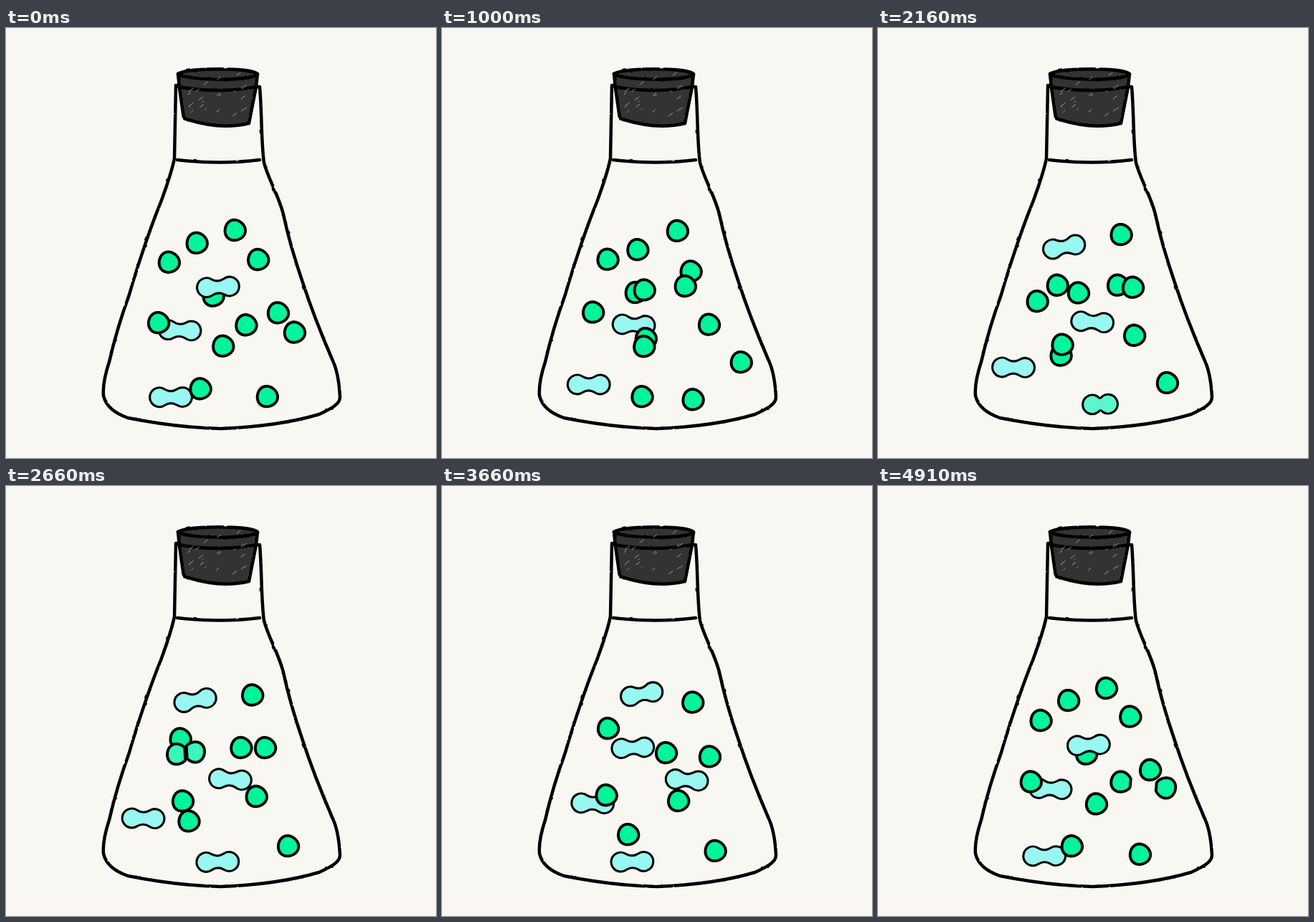
Animation of 600 by 600 pixels, one loop 5 s. Source, as an HTML page with a canvas:

```html
<!DOCTYPE html>
<html lang="en">
<head>
<meta charset="utf-8">
<title>Flask in equilibrium</title>
<style>
  html, body { margin: 0; width: 100%; height: 100%; overflow: hidden; background: #f8f7f2; }
  svg, canvas { position: absolute; left: 0; top: 0; width: 600px; height: 600px; }
</style>
</head>
<body>
<svg viewBox="0 0 600 600" fill="none" stroke="#000" stroke-width="4.5" stroke-linecap="round" stroke-linejoin="round">
  <filter id="rough" filterUnits="userSpaceOnUse" x="0" y="0" width="600" height="600" color-interpolation-filters="sRGB">
    <feTurbulence type="fractalNoise" baseFrequency=".1" numOctaves="2" seed="4"/>
    <feDisplacementMap in="SourceGraphic" scale="2" xChannelSelector="R" yChannelSelector="G"/>
  </filter>
  <g filter="url(#rough)">
    <path d="M240 80H237Q236 130 235 182C231 202 223 224 216 243C200 282 181 340 172 372C161 402 150 440 144 466
      C137 487 135 501 136 513C139 526 150 537 170 544C205 551 255 558 300 559C350 557 400 550 437 539
      C454 531 466 525 466 515C465 495 462 476 455 462C439 425 424 386 413 352C402 320 393 288 387 260
      C381 235 366 211 360 188C356 160 357 115 354 82H350"/>
    <path d="M239 184Q298 191 354 184"/>
    <path fill="#333" d="M240 64C255 55 340 55 351 64L349 82L339 133C310 140 280 137 248 126L242 84Z"/>
    <path d="M240 64C250 73 335 75 351 65M241 82Q296 92 350 82"/>
    <path id="scratches" stroke="#ccc" stroke-width=".7"/>
  </g>
</svg>
<canvas id="stage" width="600" height="600"></canvas>
<script>
const ctx = document.getElementById('stage').getContext('2d');
const GREEN = [0, 245, 155], BLUE = [152, 247, 240];
const STEPS = 60, LOOP = 5000;
const R = 14.2, LOBE = 13.4;
const TOUCH = 11, SPREAD = 16;     // half distance of the lobes when joining and when joined
const APART = 26, NEAR = 22;       // half distance of the atoms after a split and before a join

const clamp = v => Math.max(0, Math.min(1, v));
const lerp = (a, b, u) => a + (b - a) * u;
const smooth = u => u * u * (3 - 2 * u);
const blend = m => `rgb(${GREEN.map((g, i) => Math.round(lerp(g, BLUE[i], m)))})`;
const shift = ([x, y], angle, r) => [x + r * Math.cos(angle), y + r * Math.sin(angle)];

// Each pair forms at "join" and breaks at "split". Its halves then wander for some loops
// through their "via" points, evenly spread in time, to the next join.
const reactions = [
  {
    join: 16.5, split: 49.5, tilt: [-11, -11], swap: true,
    body: [[254, 317], [265, 298], [286, 287]],
    left: { loops: 1, via: [] },
    right: { loops: 4, via: [[331, 284], [349, 299], [350, 333], [327, 366], [291, 374], [252, 360], [228, 332]] }
  },
  {
    join: 26, split: 177, tilt: [-2, 5], swap: false,
    body: [[310, 525], [238, 519], [189, 473], [236, 425], [301, 410], [373, 412]],
    left: { loops: 4, via: [[263, 445], [259, 483], [274, 507]] },
    right: { loops: 4, via: [[418, 474], [393, 503], [375, 511], [355, 517]] }
  },
  {
    join: 33.5, split: 64, tilt: [-3, -3], swap: true,
    body: [[251, 372], [274, 363], [304, 361]],
    left: { loops: 1, via: [[284, 368]] },
    right: { loops: 4, via: [[360, 364], [380, 393], [362, 426], [322, 441], [277, 444], [233, 434], [210, 402]] }
  }
];

const tracks = reactions.flatMap(r => {
  const [a0, a1] = r.tilt.map(d => d * Math.PI / 180);
  const atom = ({ loops, via }, side) => {
    const from = side < 0 ? a1 + Math.PI : a1;
    const to = (side < 0) !== r.swap ? a0 + Math.PI : a0;
    const points = [shift(r.body[r.body.length - 1], from, APART), ...via, shift(r.body[0], to, NEAR)];
    return { draw: drawAtom, start: r.split, end: r.join + loops * STEPS, points, from, to };
  };
  return [
    { draw: drawPair, start: r.join, end: r.split, points: r.body, from: a0, to: a1 },
    atom(r.left, -1), atom(r.right, 1)
  ];
});

// Smooth curve through evenly timed points, u from 0 to 1.
function along(points, u) {
  const last = points.length - 1;
  const i = Math.min(Math.floor(u * last), last - 1), v = u * last - i;
  const slope = (n, k) => {
    const a = Math.max(n - 1, 0), b = Math.min(n + 1, last);
    return (points[b][k] - points[a][k]) / (b - a);
  };
  return [0, 1].map(k => lerp(points[i][k], points[i + 1][k], smooth(v))
    + v * (1 - v) * ((1 - v) * slope(i, k) - v * slope(i + 1, k)));
}

function paint(mix, width) {
  ctx.closePath();
  ctx.fillStyle = blend(mix);
  ctx.lineWidth = width;
  ctx.fill();
  ctx.stroke();
}

// Atoms spring apart after a split, snap together before a join, and are flat on that side meanwhile.
function drawAtom(track, pos, age, left) {
  const push = -(APART - 13) * clamp(1 - age / 1.5) ** 2;
  const pull = -(NEAR - TOUCH) * smooth(clamp((4.5 - left) / 3));
  const opening = clamp(1 - age / 3), closing = clamp(2 - left / 1.5);
  const wall = opening || closing ? R * (1 - 0.23 * Math.max(opening, closing)) : 2 * R;
  ctx.translate(...shift(shift(pos, track.from, push), track.to, pull));
  ctx.rotate(opening ? track.from + Math.PI : closing ? track.to + Math.PI : 0);
  ctx.beginPath();
  for (let a = 0; a < 6.28; a += 0.1) {
    const r = R + 0.4 * Math.sin(3 * a + 1);
    ctx.lineTo(Math.min(wall, r * Math.cos(a)), r * Math.sin(a));
  }
  paint(0.6 * Math.max(opening ** 2, clamp(1 - left / 4)), 3.9);
}

function drawPair(track, pos, age, left) {
  const spread = lerp(TOUCH, SPREAD, clamp(age / 3));
  const bend = 2.18, x = spread + LOBE * Math.cos(bend), y = LOBE * Math.sin(bend);
  ctx.translate(...pos);
  ctx.rotate(lerp(track.from, track.to, age / (age + left)));
  ctx.beginPath();
  ctx.arc(spread, 0, LOBE, -bend, bend);
  ctx.quadraticCurveTo(0, 6, -x, y);
  ctx.arc(-spread, 0, LOBE, Math.PI - bend, Math.PI + bend);
  ctx.quadraticCurveTo(0, -6, x, -y);
  paint(lerp(0.6, 1, Math.min(clamp(age / 3), clamp(left / 2))), 3.1);
}

function render(step) {
  ctx.clearRect(0, 0, 600, 600);
  ctx.strokeStyle = '#000';
  ctx.lineJoin = 'round';
  for (const track of tracks) {
    const { start, end, points } = track;
    // A life longer than one loop shows up once for every loop it spans.
    for (let t = step; t < end; t += STEPS) {
      if (t < start) continue;
      ctx.save();
      track.draw(track, along(points, (t - start) / (end - start)), t - start, end - t);
      ctx.restore();
    }
  }
}

function scratch() {
  let seed = 11, d = '';
  const rand = () => (seed = seed * 16807 % 2147483647) / 2147483647;
  for (let i = 0; i < 22; i++) {
    const x = 254 + rand() * 78, y = 66 + rand() * 60, len = 1 + rand() * 6;
    d += `M${x.toFixed(1)} ${y.toFixed(1)}l${len.toFixed(1)} ${(-len * 0.8).toFixed(1)}`;
  }
  document.getElementById('scratches').setAttribute('d', d);
}

// Twelve steps a second, each starting on a whole hundredth.
function tick() {
  const ms = performance.now() % LOOP;
  render(Math.floor((ms + 9.9) * STEPS / LOOP) % STEPS);
  requestAnimationFrame(tick);
}

scratch();
tick();
</script>
</body>
</html>
```
